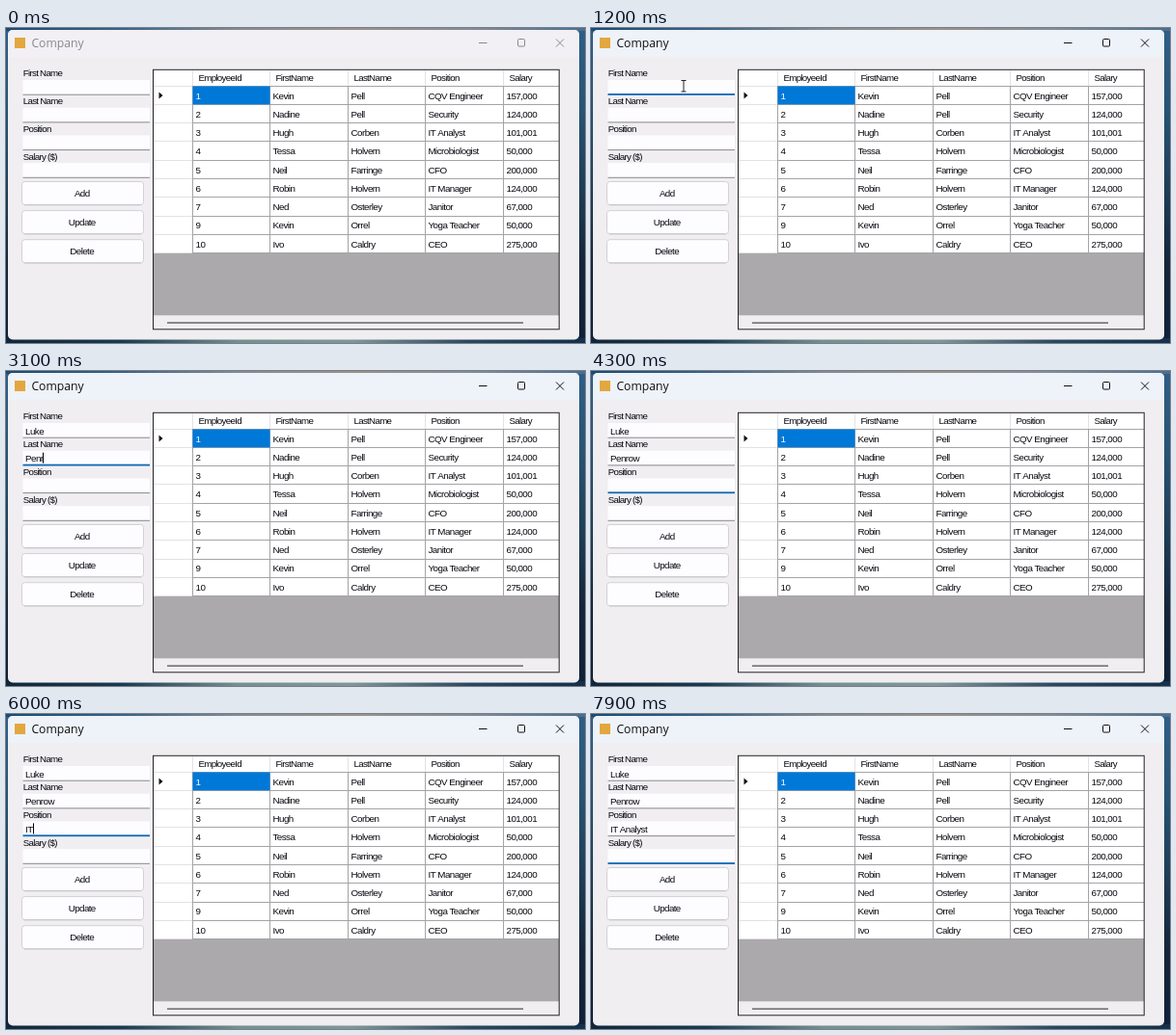
An HTML page with a canvas that plays this animation: 600 by 327 pixels, repeating every 8 s.

```html
<!DOCTYPE html>
<html lang="en">
<head>
<meta charset="utf-8">
<title>Company</title>
<style>
html, body { margin: 0; width: 100%; height: 100%; overflow: hidden; background: #17242f; }
canvas { display: block; width: 600px; height: 327px; }
</style>
</head>
<body>
<canvas id="stage" width="600" height="327"></canvas>
<script>
const ctx = document.getElementById('stage').getContext('2d');
const LOOP = 8000;
const ACTIVATE = 900;
const BLINK = 530;
const SANS = '"Liberation Sans", Arial, sans-serif';
const INK = '#080810', BODY = '#f0eef1', LINE = '#a5a3a6', PALE = '#e3e1e4', BLUE = '#0078d7';

const columns = [193, 273, 354, 434, 515];
const headers = ['EmployeeId', 'FirstName', 'LastName', 'Position', 'Salary'];
const rows = [
  ['1', 'Kevin', 'Pell', 'CQV Engineer', '157,000'],
  ['2', 'Nadine', 'Pell', 'Security', '124,000'],
  ['3', 'Hugh', 'Corben', 'IT Analyst', '101,001'],
  ['4', 'Tessa', 'Holvern', 'Microbiologist', '50,000'],
  ['5', 'Neil', 'Farringe', 'CFO', '200,000'],
  ['6', 'Robin', 'Holvern', 'IT Manager', '124,000'],
  ['7', 'Ned', 'Osterley', 'Janitor', '67,000'],
  ['9', 'Kevin', 'Orrel', 'Yoga Teacher', '50,000'],
  ['10', 'Ivo', 'Caldry', 'CEO', '275,000']
];

// focus: when the field is entered; keys: when each letter lands
const fields = [
  { label: 'First Name', text: 'Luke', focus: ACTIVATE, keys: [1700, 1800, 2000, 2100] },
  { label: 'Last Name', text: 'Penrow', focus: 2600, keys: [2800, 2900, 3000, 3100, 3300, 3400] },
  { label: 'Position', text: 'IT Analyst', focus: 3700,
    keys: [5700, 5900, 6100, 6300, 6500, 6600, 6700, 6800, 7000, 7100] },
  { label: 'Salary ($)', text: '', focus: 7300, keys: [] }
];

function rect(x, y, w, h, color) {
  ctx.fillStyle = color;
  ctx.fillRect(x, y, w, h);
}

function roundBox(x, y, w, h, r, fill, stroke) {
  ctx.beginPath();
  ctx.roundRect(x, y, w, h, r);
  ctx.fillStyle = fill;
  ctx.fill();
  ctx.strokeStyle = stroke;
  ctx.lineWidth = 1;
  ctx.stroke();
}

function path(points, color, width = 1) {
  ctx.beginPath();
  points.forEach(([x, y]) => ctx.lineTo(x, y));
  ctx.strokeStyle = color;
  ctx.lineWidth = width;
  ctx.stroke();
}

function setFont(size, spacing, family = SANS) {
  ctx.font = `${size}px ${family}`;
  ctx.letterSpacing = `${spacing}px`;
}

function label(str, x, y, color = INK, align = 'left') {
  ctx.textAlign = align;
  ctx.fillStyle = color;
  ctx.fillText(str, x, y);
}

function gradient(x1, y1, colors) {
  const g = ctx.createLinearGradient(0, 0, x1, y1);
  colors.forEach((c, i) => g.addColorStop(i / (colors.length - 1), c));
  return g;
}

function drawDesktop() {
  rect(0, 0, 600, 327, gradient(0, 327, ['#2f5f88', '#285474', '#1f3f58', '#15263a', '#0f2138']));
  rect(0, 0, 600, 3, gradient(600, 0, ['#1c4a70', '#3a6384', '#858b90', '#9a9288', '#848c95', '#4c6f8c']));
  rect(0, 322, 600, 5, gradient(600, 0, ['#12263a', '#1a3a50', '#74908f', '#7f9797', '#2a4860', '#14304a']));
}

function drawWindow(active) {
  const ink = active ? '#101010' : '#8a888d';
  ctx.save();
  ctx.beginPath();
  ctx.roundRect(2, 2, 592, 321.5, 5);
  ctx.clip();
  rect(2, 2, 592, 322, BODY);
  rect(2, 2, 592, 28, active ? '#eef2f9' : '#f2f0f4');
  ctx.restore();

  rect(9, 10, 11, 11, '#e3a73f');
  setFont(12.2, 0, '"Open Sans", "Noto Sans", sans-serif');
  label('Company', 26.4, 20, ink);
  path([[490, 15.5], [498.5, 15.5]], ink);
  ctx.beginPath();
  ctx.roundRect(530.5, 11.5, 7, 7.5, 1);
  ctx.stroke();
  path([[570, 11.5], [578, 19.5]], ink);
  path([[578, 11.5], [570, 19.5]], ink);
}

function drawGrid(t) {
  rect(153, 43, 420, 270, '#fff');
  rect(153, 234, 420, 64.6, '#aba9ac');
  rect(153, 298.6, 420, 14.4, BODY);

  for (let i = 0; i <= rows.length; i++) {
    const y = Math.floor(60 + i * 19.3);
    rect(153, y, 40, 1, PALE);
    rect(193, y, 380, 1, LINE);
  }
  columns.forEach(x => {
    rect(x, 44, 1, 16, PALE);
    rect(x, 60, 1, 174, LINE);
  });
  rect(193.5, 60.5, 80, 18.8, BLUE);

  setFont(9.7, -0.65);
  headers.forEach((h, i) => label(h, columns[i] + 6.4, 55.2));
  setFont(9.8, -0.55);
  rows.forEach((row, r) => row.forEach((cell, c) =>
    label(cell, columns[c] + 3.5, 73.5 + r * 19.27, r + c ? INK : '#fff')));

  ctx.beginPath();
  ctx.moveTo(158.5, 66.5);
  ctx.lineTo(162.5, 70);
  ctx.lineTo(158.5, 73.5);
  ctx.fillStyle = '#111';
  ctx.fill();

  // the scroll thumb thins out once the pointer leaves
  const thin = Math.min(1, Math.max(0, (t - 100) / 500));
  const tone = Math.round(135 - 65 * thin);
  rect(167, 305 + thin * 0.5, 369, 2 - thin * 0.8, `rgb(${tone},${tone},${tone})`);
  ctx.strokeStyle = '#242326';
  ctx.lineWidth = 1;
  ctx.strokeRect(152.5, 43.3, 420.7, 269.5);
}

function drawField(field, i, t, focused) {
  const top = 54 + i * 28.7;
  setFont(9.7, -0.7);
  label(field.label, 17.8, 50.4 + i * 29);
  rect(17.5, top, 131.5, 15, '#fdfcfe');
  if (focused) rect(17.5, top + 14, 131.5, 1.8, '#0f68b4');
  else rect(17.5, top + 14.7, 131.5, 1, '#8b898d');

  const typed = field.keys.filter(k => k <= t);
  const text = field.text.slice(0, typed.length);
  setFont(9.8, -0.55);
  label(text, 20, top + 11.6);

  if (!focused || t < fields[0].keys[0]) return;
  const last = typed.length ? typed[typed.length - 1] : field.focus;
  if ((t - last) % (2 * BLINK) < BLINK) {
    rect(Math.round(20 + ctx.measureText(text).width), top + 2, 1, 11, '#000');
  }
}

function drawButtons() {
  setFont(9.8, -0.6);
  ['Add', 'Update', 'Delete'].forEach((name, i) => {
    const y = 159.5 + i * 30.1;
    roundBox(16.5, y, 126, 24, 3, '#fdfcfe', '#d3d1d5');
    rect(19, y + 24, 121, 0.7, '#bab8bc');
    label(name, 78.7, y + 15.2, INK, 'center');
  });
}

function drawPointer(t) {
  if (t >= fields[0].keys[0]) return;
  const p = Math.min(1, Math.max(0, (t - 100) / 500));
  const ease = p * p * (3 - 2 * p);
  const x = 125 - 29 * ease, y = -14 + 74 * ease;
  if (y >= 54) {
    path([[x - 2.5, y - 5.5], [x + 2.5, y - 5.5]], '#222');
    path([[x, y - 5.5], [x, y + 6]], '#222');
    path([[x - 2.5, y + 6], [x + 2.5, y + 6]], '#222');
    return;
  }
  ctx.beginPath();
  [[0, 0], [0, 12], [3, 9.3], [5, 13.5], [7, 12.6], [5, 8.5], [8.7, 8.5]]
    .forEach(([dx, dy]) => ctx.lineTo(x + dx, y + dy));
  ctx.closePath();
  ctx.fillStyle = '#fff';
  ctx.fill();
  ctx.strokeStyle = '#111';
  ctx.lineWidth = 0.8;
  ctx.stroke();
}

function draw(t) {
  drawDesktop();
  drawWindow(t >= ACTIVATE);
  const current = fields.filter(f => f.focus <= t).length - 1;
  fields.forEach((f, i) => drawField(f, i, t, i === current));
  drawButtons();
  drawGrid(t);
  drawPointer(t);
}

const start = performance.now();
function tick() {
  draw((performance.now() - start) % LOOP);
  requestAnimationFrame(tick);
}
tick();
</script>
</body>
</html>
```
